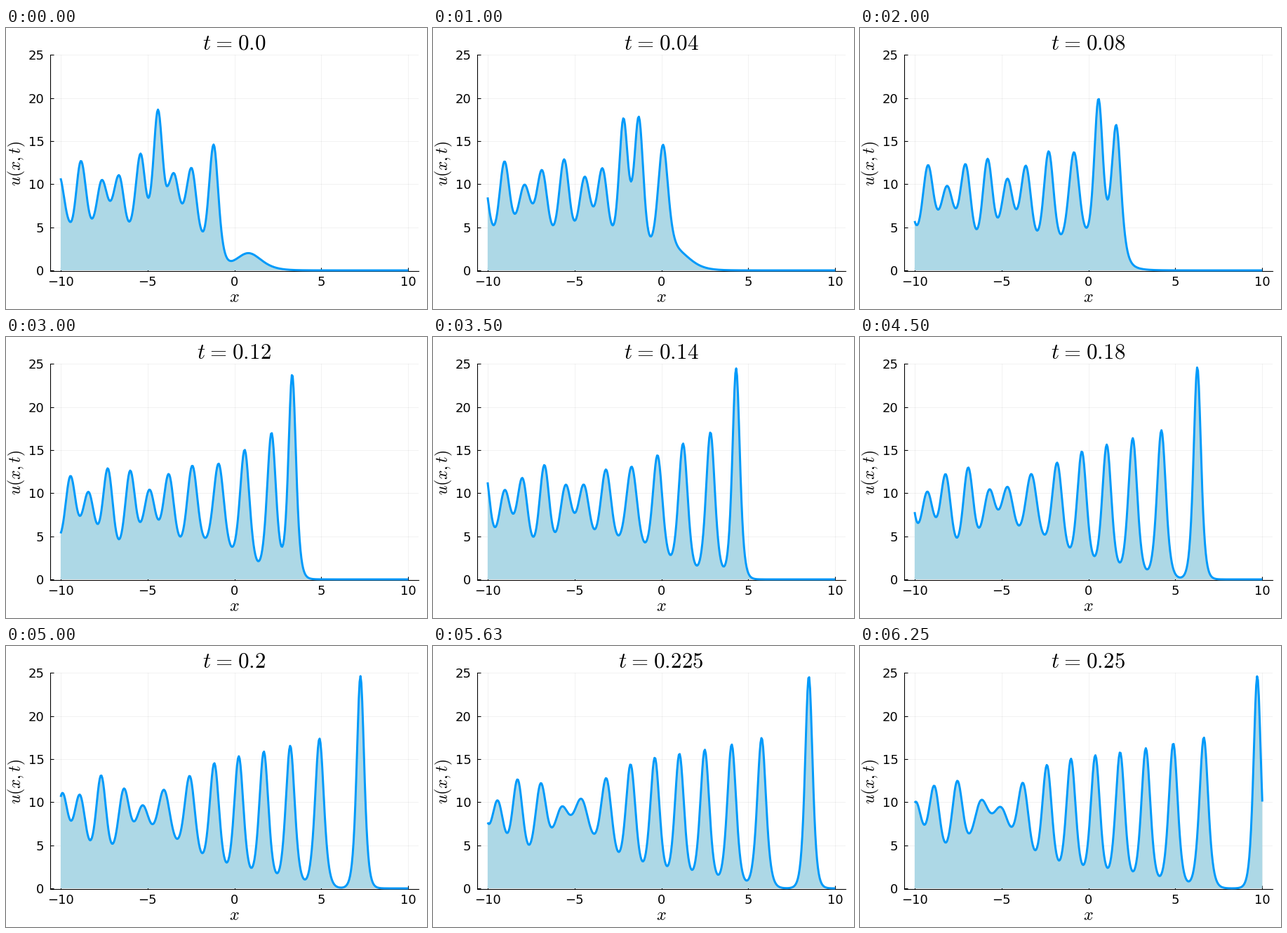
A matplotlib script for the animation above (6.37 s loop, 600x400 px).

```python
import numpy as np
import matplotlib.pyplot as plt
from matplotlib.animation import FuncAnimation

W, H, DPI = 600, 400, 100
FRAMES, LOOP_MS = 51, 6370
DT = 0.005           # model time between frames
SUBSTEPS = 100
PX = 72 / DPI        # one pixel in points

plt.rcParams["font.family"] = "DejaVu Sans"
plt.rcParams["mathtext.fontset"] = "cm"

# Turning points (crest, trough, ...) of the starting wave, right to left.
# A tall soliton rides the front part; behind it a three-crest motif repeats.
FRONT = [(-1.2, 14.6), (-1.82, 4.5), (-2.48, 11.9), (-3.0, 7.75), (-3.5, 11.3),
         (-3.88, 9.75), (-4.4, 18.65), (-4.95, 8.4), (-5.4, 13.55), (-6.05, 5.65)]
MOTIF = [(-6.65, 11.05), (-7.15, 8.05), (-7.62, 10.5), (-8.2, 6.0),
         (-8.83, 12.7), (-9.43, 5.6)]
PERIOD, REPEATS = 3.45, 9


def sech2(z):
    return 1 / np.cosh(z) ** 2


def train(c, s):
    """Periodic row of sech^2 pulses, the shape of a cnoidal wave."""
    c, s = np.broadcast_arrays(c, s)
    return sech2(c[..., None] * (s[..., None] - 2 * np.arange(-8, 9))).sum(-1)


SHARP = np.linspace(0.8, 14, 500)
STRENGTH = 2 * SHARP ** 2 * (train(SHARP, 0.0) - train(SHARP, 1.0))


def half_wave(s, strength):
    """Falls from 1 at the crest (s=0) to 0 at the trough (s=1)."""
    c = np.interp(strength, STRENGTH, SHARP)
    low = train(c, 1.0)
    return (train(c, s) - low) / (train(c, 0.0) - low)


def start_wave(x):
    points = FRONT + [(px - PERIOD * i, pu) for i in range(REPEATS) for px, pu in MOTIF]
    px, pu = np.array(points[::-1]).T
    right = np.clip(np.searchsorted(px, x), 1, len(px) - 1)
    left = right - 1
    crest = np.where(pu[left] > pu[right], left, right)
    low = np.minimum(pu[left], pu[right])
    amp = pu[crest] - low
    width = px[right] - px[left]
    s = np.clip(np.abs(x - px[crest]) / width, 0, 1)
    u = low + amp * half_wave(s, amp * width ** 2)

    # ahead of the first crest: its tail and a small slow soliton
    ahead = x > px[-1]
    pulse = sech2(np.sqrt(pu[-1] / 2) * (x[ahead] - px[-1]))
    u[ahead] = pu[-1] * pulse + (1 - pulse) * 2 * sech2(x[ahead] - 0.8)
    return u / (1 + np.exp(-(x + 30) / 0.7))


def solve_kdv(x, u):
    """All frames of u_t + 6 u u_x + u_xxx = 0, spectral RK4 with absorbing ends."""
    k = 2 * np.pi * np.fft.rfftfreq(len(x), x[1] - x[0])
    dt = DT / SUBSTEPS
    half = np.exp(0.5j * k ** 3 * dt)
    full = half ** 2
    push = -3j * k * (k < 40)
    edge = np.minimum(x - x[0], x[-1] - x)
    fade = 1 - 0.1 * np.exp(-(edge / 1.5) ** 2)

    def slope(v):
        return push * np.fft.rfft(np.fft.irfft(v) ** 2)

    waves = [u]
    for _ in range(FRAMES - 1):
        for _ in range(SUBSTEPS):
            v = np.fft.rfft(u)
            a = slope(v)
            b = slope(half * (v + dt / 2 * a))
            c = slope(half * v + dt / 2 * b)
            d = slope(full * v + dt * half * c)
            v = full * v + dt / 6 * (full * a + 2 * half * (b + c) + d)
            u = np.fft.irfft(v) * fade
        waves.append(u)
    return waves


grid = -36 + 0.05 * np.arange(1024)
shown = (grid > -10.01) & (grid < 10.01)
xs = grid[shown]
waves = [u[shown] for u in solve_kdv(grid, start_wave(grid))]

fig = plt.figure(figsize=(W / DPI, H / DPI), dpi=DPI, facecolor="white")
ax = fig.add_axes([63 / W, 1 - 345 / H, 525.2 / W, 306.8 / H])
ax.set_xlim(-10.6, 10.6)
ax.set_ylim(0, 25)
ax.spines[["top", "right"]].set_visible(False)
ax.spines[["left", "bottom"]].set_linewidth(1.1 * PX)
ax.spines["bottom"].set_position(("outward", PX))
ax.set_xticks(range(-10, 11, 5))
ax.set_yticks(range(0, 26, 5))
ax.set_axisbelow(True)
ax.grid(color="black", alpha=0.1, linewidth=0.5 * PX)
ax.tick_params(direction="in", length=5 * PX, width=1.1 * PX, labelsize=18 * PX)
ax.tick_params(axis="x", pad=7.3 * PX)
ax.tick_params(axis="y", pad=8.5 * PX)

title = fig.text(325 / W, 1 - 30.5 / H, "", fontsize=31 * PX, ha="center", va="baseline")
fig.text(325 / W, 1 - 390.3 / H, "$x$", fontsize=24 * PX, ha="center", va="baseline")
fig.text(15 / W, 1 - 193 / H, "$u(x, t)$", fontsize=23.5 * PX, rotation=90,
         ha="center", va="center")

area, = ax.fill(xs, 0 * xs, color="#ADD8E6", linewidth=0, zorder=3)
line, = ax.plot(xs, 0 * xs, color="#009AFA", linewidth=3 * PX, zorder=4,
                clip_on=False, solid_capstyle="butt", solid_joinstyle="round")


def draw(frame):
    u = waves[frame]
    line.set_ydata(u)
    area.set_xy(np.column_stack([np.r_[-10, xs, 10], np.r_[0, u, 0]]))
    title.set_text(rf"$t\hspace{{0.08}}=\hspace{{0.08}}{round(frame * DT, 3)}$")
    return area, line, title


anim = FuncAnimation(fig, draw, frames=FRAMES, interval=LOOP_MS / FRAMES,
                     repeat=True, repeat_delay=0, blit=False)
plt.show()
```
